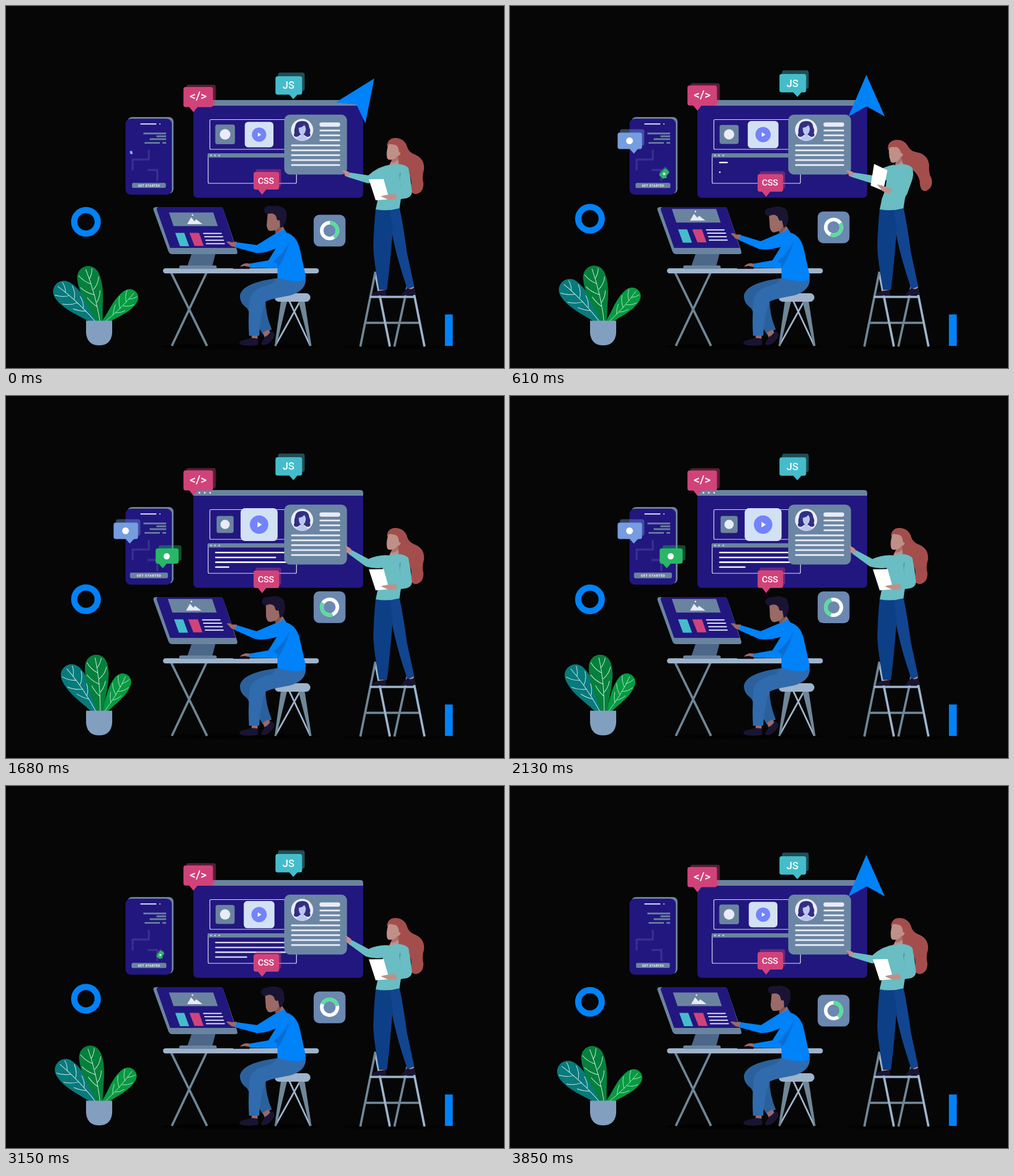
These frames come from a looping animation (877 by 639 pixels, 3880 ms). An HTML page:

```html
<!DOCTYPE html>
<html lang="en">
<head>
<meta charset="utf-8">
<title>Web development scene</title>
<style>
  html, body { margin: 0; height: 100%; overflow: hidden; background: #060606; }
  svg { display: block; width: 100%; height: 100%; }
  text { font-family: Roboto, "Open Sans", sans-serif; font-weight: 500; fill: #fff; text-anchor: middle; }
  .navy { fill: #22177f; }
  .slate { fill: #6a849f; }
  .white { fill: #e9ebf8; }
  .line { fill: none; stroke: #e9ebf8; stroke-width: 3; stroke-linecap: round; }
  .thin { stroke-width: 2; }
  .typed { stroke: #fff; stroke-width: 2.6; }
  .leg { fill: none; stroke: #6f8797; stroke-width: 4; }
  .light { stroke: #9db4cc; }
  .blue { fill: #0082f8; }
  .skin { fill: #9a6a66; }
  .fair { fill: #c08f88; }
  .dark { fill: #1a1433; }
  .knit { fill: #69bdc3; }
  .vein { fill: none; stroke: #d5efe4; stroke-width: 1; }
</style>
</head>
<body>
<svg id="stage" viewBox="0 0 877 639"></svg>
<script>
const LOOP = 3880;
const stage = document.getElementById('stage');

// Speech bubble: box, tail from the box's bottom edge, offset shadow box
const bubble = (id, color, [x, y, w, h], [tailX, tailH], [dx, dy], content) => `
  <g id="${id}" fill="${color}">
    <rect x="${x + dx}" y="${y + dy}" width="${w}" height="${h}" rx="4" opacity=".4"/>
    <rect x="${x}" y="${y}" width="${w}" height="${h}" rx="4"/>
    <path d="M${tailX - 8} ${y + h - 1}h16l-8 ${tailH + 1}z"/>
    ${content}
  </g>`;

const leaf = (id, color) => `
  <g id="${id}">
    <path fill="${color}" d="M-5 0C-9-25-24-52-20-79C-17-104 17-104 20-79C24-52 9-25 5 0Z"/>
    <path class="vein" d="M0 0Q5-50-1-93M3-35Q11-42 14-53M3-57Q14-64 18-76M1-76Q8-83 10-92
      M2-28Q-6-36-11-47M3-48Q-11-55-18-66M2-67Q-10-74-16-86"/>
  </g>`;

const rows = (x1, x2, ys) => ys.map(y => `M${x1} ${y}H${x2}`).join('');

const phone = `
  <rect class="slate" x="214" y="196" width="81" height="135" rx="8"/>
  <rect class="navy" x="210.5" y="199" width="81.5" height="134" rx="9"/>
  <path class="line thin" d="M237.5 208.2H264M271 208.2h.2"/>
  <path fill="none" stroke="#6a849f" stroke-width="2.8" d="M242 225h40M265 230h17M253 235h29M244 241.7h27M275.5 241.7h6.5"/>
  <path fill="none" stroke="#39308f" stroke-width="3.5" d="M223 290V271H251.5V254M249 289.5H266.5V309"/>
  <g id="button">
    <rect class="slate" x="222" y="312.3" width="59.5" height="8.8" rx="2.5"/>
    <text x="252" y="318.600" font-size="5" letter-spacing=".6" style="font-weight:700">GET STARTED</text>
  </g>`;

const browser = `
  <rect class="navy" x="330" y="166" width="299" height="172.5" rx="7"/>
  <path class="slate" d="M330 176v-5q0-5 5-5h289q5 0 5 5v5z"/>
  <path class="line" d="M340.5 170.8h.1M350 170.8h.1M359.5 170.8h.1"/>
  <g fill="none" stroke="#e9ebf8" stroke-width="1.2">
    <rect x="359" y="200.5" width="140" height="52.5" rx="2"/>
    <rect x="356" y="260.5" width="155.5" height="52.5" rx="2"/>
  </g>
  <rect class="slate" x="355.5" y="260" width="156" height="7.5" rx="1"/>
  <path class="line" style="stroke:#c5d0e4" d="M361 263.8h.1M368 263.8h.1M375.5 263.8h.1"/>
  <g id="code"></g>
  <g id="record">
    <rect class="slate" x="368.5" y="209.3" width="34.7" height="34.7" rx="4"/>
    <circle class="white" cx="385.8" cy="226.7" r="9.4"/>
  </g>
  <g id="play">
    <rect x="420.5" y="204.5" width="50.5" height="45" rx="6" fill="#d3e1f5"/>
    <circle cx="445.7" cy="227" r="12.6" fill="#7383fb"/>
    <path fill="#fff" d="M443.5 223.2v7.6l6-3.8z"/>
  </g>
  <rect x="490" y="191.7" width="110.5" height="105.8" rx="10" fill="#6b86a3"/>
  <circle class="white" cx="521.5" cy="218.8" r="19.5"/>
  <path fill="#322f82" d="M511 231Q505 230 508 224Q507 219 509 214Q510 203 522 203Q533 203 534 214Q537 219 535 224Q538 230 532 231Q528 231 526 228H517Q515 231 511 231Z"/>
  <path fill="#b9c6f0" d="M515.500 215Q523 214 525 210Q528 213 528 218Q527 224 524.500 226V230Q530 231 532 235Q522 240 511 235Q513 231 518.500 230V226Q515.500 223 515.500 215Z"/>
  <rect class="white" x="552" y="205.5" width="36.5" height="7.5" rx="3.7"/>
  <path class="line" d="${rows(553.5, 587, [219.8, 228.3, 237])}${rows(503.5, 587, [246, 254.7, 263.3, 272, 280.7])}"/>`;

const monitor = `
  <path fill="#4c6788" d="M327 437H369L363 460H319Z"/>
  <rect class="slate" x="305" y="458" width="66" height="6" rx="3"/>
  <path class="slate" d="M264 355H377Q381 355 383 360L407 432Q409 438 404 438H293Q288 438 286 433L260 361Q258 355 264 355Z"/>
  <path class="navy" d="M269 355H377Q381 355 383 360L404.5 427H289L266 361Q264 355 269 355Z"/>
  <g id="page">
    <path class="slate" d="M287 364.5H365L373 388.5H295Z"/>
    <path class="white" d="M319 385L326 373L332 380L335 376.5L346 385Z"/>
    <circle class="white" cx="328.5" cy="369" r="1.5"/>
    <path fill="#45bccb" d="M298 400.5H314L322.5 424H306.5Z"/>
    <path fill="#d0437a" d="M323 400.5H340L348 423.5H332Z"/>
    <path class="line thin" d="M348 401.5h31M350 407.3h31.5M352 413.5h31M353 419.5h31.5"/>
  </g>`;

const furniture = `
  <g fill="#020202"><ellipse cx="412" cy="601" rx="140" ry="5"/><ellipse cx="680" cy="602" rx="88" ry="4"/></g>
  <path class="leg" d="M291 471L354 600M353 471L292 600"/>
  <rect x="276.5" y="463" width="274.5" height="9" rx="4.5" fill="#9db4cc"/>
  <path class="leg light" style="stroke-width:3" d="M499 521L536 600M518 521L474 600"/>
  <path fill="#6f8797" d="M484 521H495L476 600H473ZM515 521H526L538 600H535Z"/>
  <rect x="473" y="507" width="63" height="15" rx="7.5" fill="#9db4cc"/>`;

const ladder = `
  <path class="leg" d="M708 490L684 601M634 559.3H729"/>
  <path class="leg light" d="M650 470L676 601M715 490L737 601"/>
  <path class="leg" d="M650.5 469L624 601"/>
  <path class="leg light" d="M641 513.5H721"/>`;

const man = `
  <path fill="#2a619c" d="M481 480Q416 488 412 511Q411 524 424 533L452 579L468 571Q457 545 457 518L500 500Z"/>
  <path class="skin" d="M452 577L462 571L466 577L456 586ZM433 580H443V590H432Z"/>
  <path fill="#306bad" d="M480 479Q505 487 528 480Q529 503 500 511Q465 517 457 522Q447 550 446 582H428Q426 550 429 520Q431 499 468 491Z"/>
  <path class="dark" d="M449 597L456 584Q463 581 466 574Q473 576 473 582Q469 591 460 597Q452 600 449 597ZM411 597Q411 590 421 589L433 586L444 587V598Q425 602 411 597Z"/>
  <g id="manHead">
    <path class="skin" d="M461 364L459 387Q460 398 467 397L474 396L475 405L491 396L485 383L480 364Z"/>
    <path fill="#7d5557" d="M474 396Q481 393 483 386L486 393L475 402Z"/>
    <path class="dark" d="M460 367Q453 365 455 357Q459 352 468 353Q480 351 487 356Q494 358 494 368Q495 377 491 384Q488 392 483 391L482 378Q477 381 476 372Q474 367 468 366Z"/>
  </g>
  <path class="skin" d="M412 460Q416 455 423 454L431 455V461L420 459Z"/>
  <path class="dark" d="M400 462.5H429V464H400Z"/>
  <path class="blue" d="M474 403L490 394L494 400Q511 405 517 427L528 477Q526 486 512 486Q494 485 478 480V463L429 462L428 455L462 449L477 425Z"/>
  <path fill="#0a6dd2" d="M500 414Q491 445 478 463V455Q474 453 471 451Q489 438 500 414Z"/>
  <g id="manArm">
    <path class="skin" d="M388 417Q392 414 397 417L406 416V426L397 424L391 419Z"/>
    <path class="blue" d="M406 417L442 422L474 402Q492 399 494 412Q492 420 480 426Q456 437 441 436L404 426Z"/>
  </g>`;

const woman = `
  <path class="fair" d="M657 498H669V505H657ZM707 494L716 492L719 502H707Z"/>
  <path fill="#124590" d="M664 358L693 356Q700 390 706 435L719 495L707 500Q688 445 680 402Z"/>
  <path fill="#0d3f86" d="M651 359L676 360L681 395Q677 450 671 501H657Q646 440 647 420Q648 385 651 359Z"/>
  <path class="dark" d="M644 511Q645 505 656 503L669 501V511ZM696 511Q699 505 707 498Q713 502 719 497L721 510Z"/>
  <g id="womanHead">
    <path fill="#a34e4c" d="M671 246Q673 232 688 233Q703 235 707 250Q710 259 722 263Q738 271 736 289Q732 302 735 312Q736 329 722 332Q710 333 714 312Q712 287 688 282Z"/>
    <path class="fair" d="M674 243Q669 256 671 268Q673 273 680 271L675 281Q683 286 692 281L690 265Q697 262 695 256L690 246Z"/>
    <path fill="#a7726f" d="M680 271Q686 270 690 264V272Q682 278 678 276Z"/>
    <path fill="#a34e4c" d="M671 247Q672 234 686 233Q700 236 702 257L693 265Q697 258 692 258Q692 246 682 243Q676 242 671 247Z"/>
  </g>
  <path class="knit" d="M664 292Q671 280 689 279Q704 279 709 287Q712 300 704 312Q696 330 693 357Q672 363 651 359L655 340Q664 320 664 292Z"/>
  <g id="pointArm">
    <path class="fair" d="M591 291Q594 289 602 292L608 296L605 303L597 300L595 293Z"/>
    <path class="knit" d="M606 294L638 299Q655 283 677 280L673 302Q655 313 637 313L602 302Z"/>
  </g>
  <g id="holdArm">
    <path fill="#fff" d="M639 306L665 305.5L675 341L651 343Z"/>
    <path class="fair" d="M660 336Q672 332 689 332V341L674 342Z"/>
    <path class="knit" d="M694 283Q709 281 712 304L715 328Q714 339 701 340L688 342L687 332L698 327Q692 310 692 295Z"/>
  </g>
  <path id="sleeveFold" fill="#3c8d97" d="M695 294Q692 310 697 322Q693 310 693 296Z"/>`;

stage.innerHTML = `
  ${furniture}${phone}
  ${bubble('blueBubble', '#759de0', [189.5, 223.5, 43, 29], [218, 8], [4, -6], '<circle cx="210.5" cy="238" r="6" fill="#fff"/>')}
  ${bubble('greenBubble', '#28b766', [263.5, 269, 40.5, 27], [276, 8], [5, -5.5], '<circle cx="283" cy="283" r="5.5" fill="#fff"/>')}
  ${browser}
  ${bubble('tagBubble', '#d0437a', [312.5, 143, 52, 35.5], [330, 9], [5, -4], '<text x="338.5" y="166.5" font-size="21">&lt;/&gt;</text>')}
  ${bubble('jsBubble', '#45bccb', [474.5, 124, 47, 32.5], [506, 8], [4.5, -6.5], '<text x="497.5" y="146.5" font-size="18">JS</text>')}
  ${bubble('cssBubble', '#d0437a', [436, 293, 45, 31], [451, 9], [3.5, -5], '<text x="457.8" y="313.700" font-size="15.5">CSS</text>')}
  <path id="arrow" class="blue" d="M627.5 121.5L660 195L628 177L596 195Z"/>
  <g id="chart">
    <rect x="541.8" y="368.5" width="56" height="56" rx="10" fill="#6b88b0"/>
    <g id="donut" fill="none" stroke-width="6.3">
      <circle cx="569.8" cy="396.5" r="13.8" stroke="#fff"/>
      <circle cx="569.8" cy="396.5" r="13.8" stroke="#5cdc9a" pathLength="360" stroke-dasharray="145 215" transform="rotate(-88 569.8 396.5)"/>
    </g>
  </g>
  <circle id="ring" cx="140.8" cy="381" r="20.7" fill="none" stroke="#0082f8" stroke-width="11"/>
  <rect class="blue" x="773" y="544.5" width="13.7" height="55.5"/>
  ${leaf('leftLeaf', '#077a7c')}${leaf('rightLeaf', '#069a41')}${leaf('midLeaf', '#05803c')}
  <path fill="#839fc0" d="M141 555.5H187V577Q185 599 164 599Q143 599 141 577Z"/>
  ${monitor}${man}${ladder}${woman}`;

const clamp = x => Math.min(1, Math.max(0, x));
const part = id => document.getElementById(id);
const move = (id, transform) => part(id).setAttribute('transform', transform);
const fade = (id, opacity) => part(id).setAttribute('opacity', opacity);
const shift = (id, y) => move(id, `translate(0 ${y})`);
const turn = (id, angle, x, y) => move(id, `rotate(${angle} ${x} ${y})`);
const about = (id, x, y, scale, angle = 0) =>
  move(id, `translate(${x} ${y}) rotate(${angle}) scale(${scale}) translate(${-x} ${-y})`);

// Typed code rows: y, start time, px per ms, final length
const codeRows = [[276.3, 500, .133, 130], [285, 845, .128, 130], [293.4, 600, .117, 130], [302, 1170, .048, 56]];

function draw(t) {
  const linear = (a, b) => clamp((t - a) / (b - a));
  const ease = (a, b) => { const x = linear(a, b); return x * x * (3 - 2 * x); };
  const pop = (inStart, outStart) =>
    Math.max(0, 1 - (1 - linear(inStart, inStart + 450)) ** 3 - linear(outStart, outStart + 400) ** 3);
  const rise = (1 - Math.cos(2 * Math.PI * linear(0, 3760))) / 2;

  shift('ring', -23 * rise);
  shift('jsBubble', -16.5 * rise);
  shift('tagBubble', -12 * rise);
  shift('cssBubble', 15.5 * rise);
  shift('chart', -24.5 * rise);
  turn('donut', 360 * t / LOOP, 569.8, 396.5);
  about('play', 445.7, 227, 1 + .3 * rise);
  about('record', 385.8, 226.7, 1 - .14 * rise);
  about('button', 251.7, 316.7, 1 + .13 * rise);

  move('leftLeaf', `translate(160 560) rotate(${-46 + 13 * rise}) scale(.98 1.02)`);
  move('midLeaf', `translate(166 560) rotate(${-14.5 + 10 * rise}) scale(1 1.06)`);
  move('rightLeaf', `translate(171 560) rotate(${46 - 14.5 * rise}) scale(.78 .82)`);

  const blue = pop(-20, 2200);
  const green = pop(540, 2800);
  about('blueBubble', 218, 260.5, blue, 80 * (1 - blue));
  about('greenBubble', 276, 304, green, -80 * (1 - green) + 4 * (ease(900, 1150) - ease(1250, 1600)));

  const climb = t < 2000 ? Math.max(0, t - 960) * .16 : 0;
  move('arrow', `translate(0 ${-climb}) rotate(${35 * (1 - ease(0, 480))} 627.5 158)`);
  fade('arrow', 1 - ease(1300, 1640) + ease(3400, 3800));

  part('code').innerHTML = codeRows.map(([y, start, speed, max]) => {
    const length = Math.min(max, (t - start) * speed);
    return length > 0 ? `<path class="line typed" d="M369.5 ${y}h${Math.max(.1, length - 2)}"/>` : '';
  }).join('');
  fade('code', 1 - ease(3050, 3450));

  const swipe = ease(80, 480) - ease(2440, 2700);
  turn('manArm', 9 * swipe, 485, 414);
  move('page', `translate(${-2 * swipe} ${-6.3 * swipe})`);
  turn('manHead', -4.5 * (1 - Math.cos(6 * Math.PI * t / LOOP)), 482, 398);

  const read = ease(100, 520) - ease(720, 1160);
  move('womanHead', `translate(${read} ${3 * read}) rotate(${-12 * read} 685 278)`);
  turn('holdArm', 27 * read, 697, 297);
  fade('sleeveFold', 1 - read);
  turn('pointArm', 19 * (ease(1200, 1640) - ease(3240, 3780)), 672, 295);
}

function frame() {
  draw(performance.now() % LOOP);
  requestAnimationFrame(frame);
}
frame();
</script>
</body>
</html>
```
